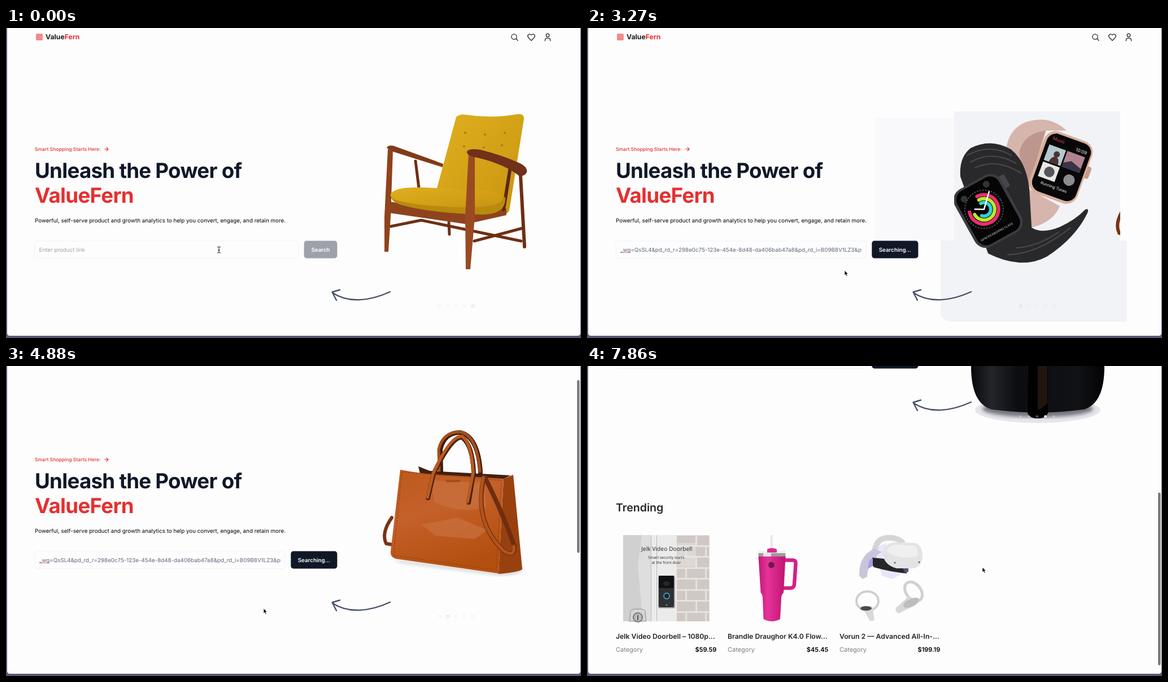
Write an HTML page that moves like this. It is 1018 by 550 pixels and loops after 8000 ms.

```html
<!DOCTYPE html>
<html lang="en">
<head>
<meta charset="utf-8">
<title>ValueFern</title>
<style>
html, body { margin: 0; width: 100%; height: 100%; overflow: hidden; background: #5a5775; }
svg { display: block; width: 1018px; height: 550px; font-family: Inter, sans-serif; font-optical-sizing: none; text-rendering: geometricPrecision; }
.b { font-weight: 700; }
.sb { font-weight: 600; }
.red { fill: #e43030; }
.line { fill: none; stroke-linecap: round; stroke-linejoin: round; }
.mid { text-anchor: middle; }
.end { text-anchor: end; }
.sm { font-size: 9.79px; }
.h1 { font-size: 36.7px; letter-spacing: -.73px; }
.title { font-size: 12.23px; fill: #222; }
.meta { font-size: 11px; }
.ad { font-family: "Open Sans", sans-serif; fill: #222; }
#dots circle { fill: #fff; filter: drop-shadow(.9px .9px .5px rgba(0, 0, 0, .8)); }
</style>
</head>
<body>
<svg viewBox="0 0 1018 550">
<defs>
  <clipPath id="win"><path d="M2 0H1017V541Q1017 546 1012 546H7Q2 546 2 541Z"/></clipPath>
  <clipPath id="frame"><rect x="650" y="140" width="294" height="382"/></clipPath>
  <clipPath id="field"><rect id="fieldClip" x="58" y="380" height="26"/></clipPath>
  <linearGradient id="cloth" x2="1" y2="1"><stop stop-color="#e0b01f"/><stop offset="1" stop-color="#c9940f"/></linearGradient>
  <linearGradient id="leather" x2=".4" y2="1"><stop stop-color="#bd5a1c"/><stop offset=".45" stop-color="#c4602a"/><stop offset="1" stop-color="#b4500f"/></linearGradient>
  <linearGradient id="gloss"><stop stop-color="#08080b"/><stop offset=".15" stop-color="#24252b"/><stop offset=".35" stop-color="#0c0d10"/><stop offset=".8" stop-color="#111216"/><stop offset="1" stop-color="#030304"/></linearGradient>
  <linearGradient id="wood"><stop stop-color="#28150b"/><stop offset=".4" stop-color="#5a3419"/><stop offset="1" stop-color="#1d0f08"/></linearGradient>
  <linearGradient id="pink"><stop stop-color="#c2187a"/><stop offset=".35" stop-color="#e6339a"/><stop offset="1" stop-color="#c0126f"/></linearGradient>
  <filter id="soft"><feGaussianBlur stdDeviation="3"/></filter>
  <pattern id="brick" x="160" y="276" width="66" height="39" patternUnits="userSpaceOnUse">
    <rect width="66" height="39" fill="#e6e2df"/>
    <path fill="#d0c8c4" d="M0 1H32V18H0ZM35 1H66V18H35ZM0 21H14V37H0ZM17 21H49V37H17ZM52 21H66V37H52Z"/>
  </pattern>
</defs>

<g clip-path="url(#win)">
<rect width="1018" height="550" fill="#fdfdfd"/>
<g id="page">
  <!-- header -->
  <rect x="53" y="10" width="12" height="12" rx="2" fill="#f58a8a"/>
  <text class="b" x="70" y="20.4" font-size="12.23" fill="#1c1c1c">Value<tspan class="red">Fern</tspan></text>
  <g class="line" stroke="#282828" stroke-width="1.3">
    <circle cx="899.5" cy="15.5" r="4.6"/><path d="M903 19L906.2 22.2"/>
    <path d="M930 22.3L924.8 17Q922.7 14.3 924.6 12Q927.3 9.6 930 12.6Q932.7 9.6 935.4 12Q937.3 14.3 935.2 17Z"/>
    <circle cx="959" cy="13" r="2.8"/><path d="M954.4 22.8V21.5Q954.6 18.3 957.4 18.2H960.6Q963.4 18.3 963.6 21.5V22.8"/>
  </g>

  <!-- panels behind the carousel -->
  <g id="panelA">
    <path fill="#f2f3f7" d="M650 148H944V379H956V521H642Q628 519 626 506H650Z"/>
    <rect x="510" y="160" width="434" height="260" fill="#f7f7fa"/>
  </g>
  <g id="panelB">
    <rect x="510" y="160" width="140" height="217" fill="#f9f9fb"/>
    <path fill="#f2f3f7" d="M650 148H944V377H956V521H644Q626 519 626 502V377H650Z"/>
  </g>
  <rect id="panelC" x="698" y="148" width="246" height="374" fill="#f2f3f7"/>

  <!-- hero text -->
  <text class="red" x="51" y="218" font-size="8.56" font-weight="500">Smart Shopping Starts Here:</text>
  <path class="line" stroke="#e43030" stroke-width="1.1" d="M174.5 215H181M178 212L181 215L178 218"/>
  <text class="b h1" x="51" y="266" fill="#101828">Unleash the Power of</text>
  <text class="b h1 red" x="51" y="310">ValueFern</text>
  <text class="sm" x="51" y="344.5">Powerful, self-serve product and growth analytics to help you convert, engage, and retain more.</text>

  <!-- search form -->
  <rect id="box" x="51" y="378" height="30.5" rx="5" fill="#fdfdfe" stroke="#eeeff2" stroke-width=".8"/>
  <text id="hint" class="sm" x="58.5" y="396.5" fill="#a0a3ab">Enter product link</text>
  <g clip-path="url(#field)">
    <text id="link" class="sm" x="59" y="396.5" fill="#5e677a">_wg=QsSL4&amp;pd_rd_r=298e0c75-123e-454e-8d48-da406bab47a8&amp;pd_rd_i=B09B8V1LZ3&amp;psc=1</text>
    <path id="spell" d="M59.5 398.3H77" stroke="#e0343c" stroke-width="1.2" stroke-dasharray="1.3 1"/>
  </g>
  <rect id="caret" x="59" y="387" width="1" height="13" fill="#222"/>
  <rect id="btn" y="377.6" height="30.8" rx="4.5"/>
  <text id="btnText" class="sm sb mid" y="396.5" fill="#fff"></text>

  <!-- carousel -->
  <g clip-path="url(#frame)"><g id="strip">
    <g>
      <g class="line" stroke="#6e2f14" stroke-width="6">
        <path d="M725 236L731 284M784 345L785 366M681 352L735 341L912 378M829 378L915 355" stroke-width="5"/>
        <path d="M911 262L918 388"/>
      </g>
      <path fill="url(#cloth)" d="M797 158Q803 152 815 154Q860 161 905 153Q917 151 917 161L891 324Q888 331 878 329L762 288Z"/>
      <g fill="#a87c0c"><circle cx="813" cy="186" r="2"/><circle cx="848" cy="189" r="2"/><circle cx="883" cy="186" r="2"/><circle cx="811" cy="210" r="2"/><circle cx="846" cy="212" r="2"/><circle cx="878" cy="208" r="2"/></g>
      <path fill="#823a18" d="M674 213Q676 207 686 209L774 241L773 247L684 219Z"/>
      <path fill="#8f431d" d="M676 215L685 217L681 335L677 397H670L670 335ZM679 308L815 330L886 320V332L815 348L678 328Z"/>
      <path class="line" stroke="#5d2812" stroke-width="6" d="M893 246L881 322"/>
      <path fill="#b98a0e" d="M681 295Q760 322 884 300Q886 330 845 331Q755 329 700 314Q680 308 681 295Z"/>
      <path fill="url(#cloth)" d="M681 294Q690 281 740 283L850 288Q880 291 880 304Q872 318 820 318Q730 317 690 305Q680 301 681 294Z"/>
      <path fill="#9a4a22" d="M819 222H830V335L822 428H814L813 335Z"/>
      <path fill="#70301a" d="M816 219Q820 213 840 216Q880 226 910 240Q924 247 922 256Q918 264 908 262Q880 240 830 229Q815 226 816 219Z"/>
    </g>

    <g transform="translate(294)">
      <path fill="#d6b5ac" d="M766 225Q768 178 805 166Q845 154 874 182L838 182L806 285L862 316Q850 345 812 354L800 275Z"/>
      <path fill="#bd978d" d="M790 222Q796 188 836 182L808 278Q795 250 790 222Z"/>
      <path fill="#29292c" d="M686 264Q683 230 704 213Q740 195 775 215Q802 236 808 285L812 354Q830 366 862 353Q890 340 907 322Q914 319 911 328Q890 372 840 405Q795 430 735 400Z"/>
      <path class="line" stroke="#4d4d50" stroke-width="2" stroke-dasharray="2 2" d="M698 226Q738 204 776 226M704 238Q742 216 784 240M712 248Q750 230 794 258M770 402Q820 402 880 355M785 390Q822 388 860 362"/>
      <g transform="translate(864 247) rotate(20)">
        <rect x="42" y="-18" width="10" height="22" rx="4" fill="#c99b84"/>
        <rect x="-45" y="-58" width="90" height="117" rx="21" fill="#d9ae98"/>
        <rect x="-40" y="-54" width="82" height="108" rx="17" fill="#08080a"/>
        <g transform="translate(0 2) scale(.92)">
          <path fill="#b5c8cf" d="M-36 -36H-2V-4H-36Z"/><path fill="#4a3430" d="M-26 -4Q-24 -16 -18 -17A6 6 0 1 1 -14 -17Q-8 -16 -7 -4Z"/>
          <path fill="#b18390" d="M1 -36H37V-4H1Z"/><path fill="#3a3448" d="M1 -12L15 -20L37 -12V-4H1Z"/>
          <path fill="#e8e8e6" d="M-36 -1H-2V29H-36Z"/><circle cx="-18" cy="14" r="10" fill="#55555a"/><circle cx="23" cy="16" r="11" fill="#8b8c90"/>
        </g>
        <text x="-31" y="-41" font-size="8" fill="#ef3b56">Music</text>
        <text x="14" y="-36" font-size="8" fill="#fff">10:09</text>
        <text class="mid" y="40" font-size="7" fill="#fff">Running Tunes</text>
      </g>
      <g transform="translate(737 328) rotate(-29)">
        <rect x="43" y="-48" width="13" height="24" rx="4" fill="#45464a"/>
        <rect x="-47" y="-62" width="94" height="116" rx="22" fill="#3b3c40"/>
        <rect x="-42" y="-58" width="84" height="108" rx="18" fill="#050506"/>
        <circle cx="-27" cy="-43" r="6" fill="#333"/><circle cx="20" cy="-47" r="6" fill="#333"/>
        <g class="line" stroke-width="6" transform="translate(-5 -10)">
          <circle r="34" stroke="#555" stroke-width="2" stroke-dasharray="1 4"/>
          <path stroke="#ed2c72" d="M0 -26A26 26 0 1 1 -25 -8"/><path stroke="#bce92b" d="M0 -19A19 19 0 1 1 -19 0"/><path stroke="#2fd3d8" d="M0 -12A12 12 0 1 1 -9 8"/>
          <path stroke="#fff" stroke-width="2.5" d="M0 0L23 -23M0 0L-14 -8"/>
        </g>
        <text class="mid" x="-5" y="38" font-size="5.2" fill="#ddd">12PM KICKBOXING CLASS</text>
      </g>
    </g>

    <g transform="translate(588)">
      <path fill="#cfcdd0" filter="url(#soft)" d="M685 392L872 414L914 404Q920 420 872 420L700 398Z"/>
      <path class="line" stroke="#7a3312" stroke-width="6" d="M683 318Q664 345 673 364L684 366"/>
      <path fill="#43200f" d="M730 227L750 235L893 243L876 252L733 240Z"/>
      <g class="line"><path stroke="#3a1d10" stroke-width="8" d="M770 236L769 197Q776 167 804 167Q836 174 840 238"/><path stroke="#a84d1b" stroke-width="5" d="M767 234L766 197Q773 166 804 166Q834 172 839 236"/></g>
      <path fill="url(#leather)" d="M698 233Q730 239 755 241L881 249L872 417L690 391Q680 388 681 378Z"/>
      <path fill="#c9713f" d="M752 252L846 256L850 300Q800 312 758 290ZM735 330L800 318L852 340L830 356L760 350Z" opacity=".7"/>
      <path fill="#98410f" d="M881 249L898 242L914 409Q913 414 872 418Z"/>
      <path fill="none" stroke="#8d3d10" stroke-dasharray="3 2" d="M701 237L877 252L868 411L686 385Z"/>
      <rect x="779" y="251" width="25" height="4" rx="1" fill="#a54c1a"/>
      <g class="line"><path stroke="#4a2210" stroke-width="8" d="M747 283L757 240Q790 172 808 176Q826 190 828 238L819 291"/><path stroke="#b85a22" stroke-width="5.500" d="M746 282L756 240Q788 170 808 174Q824 186 827 238L817 290"/>
      <path stroke="#6f2e0e" stroke-width="8" d="M846 247Q828 325 880 376Q901 390 900 369Q882 315 848 247"/><path stroke="#b1531c" stroke-width="5.500" d="M845 247Q828 325 880 376Q901 390 899 369"/></g>
    </g>

    <g transform="translate(882)">
      <path fill="#e9dcc4" d="M756 170H855L884 292H727Z"/>
      <path fill="url(#wood)" d="M796 292H815V350Q846 366 847 410Q847 437 806 437Q764 437 764 410Q765 366 796 350Z"/>
    </g>

    <g transform="translate(1176)">
      <ellipse cx="798" cy="482" rx="111" ry="23" fill="#e6e5eb"/>
      <ellipse cx="798" cy="480" rx="98" ry="15" fill="#77757e" filter="url(#soft)"/>
      <path fill="url(#gloss)" d="M684 250Q690 155 798 155Q906 155 912 250L916 405Q916 470 880 481Q800 492 716 481Q680 470 680 405Z"/>
      <path fill="none" stroke="#34353b" d="M683 300H913M779 310V400Q782 408 781 480"/>
      <path fill="#010102" d="M781 310H816V488Q812 497 798 497Q784 497 780 488Z"/>
      <path fill="#20160f" d="M798 400H815V470Q806 480 798 482Z"/>
    </g>
  </g></g>
  <g id="dots"></g>
  <path class="line" stroke="#475069" stroke-width="2.4" d="M680 468C645 484 607 489 578.500 470M591 464.500L577.500 468.500L585 483"/>

  <!-- trending -->
  <g transform="translate(0 428)">
    <text class="sb" x="51" y="234" font-size="19.6" fill="#282828">Trending</text>
    <g>
      <rect x="64" y="276" width="152.5" height="153" fill="#dedede"/>
      <path fill="#d0d0d0" d="M64 276H97L90 330L99 429H64Z"/><path fill="#ebebeb" d="M113 276H159V429H113Z"/><path stroke="#bcbcbc" d="M113.5 276V429M123.5 276V429"/>
      <rect x="159" y="276" width="57.5" height="153" fill="url(#brick)"/>
      <path fill="#e9e9e7" d="M160 290H193V332H160Z" opacity=".5"/>
      <text class="ad mid" x="141.3" y="303.5" font-size="10.3">Jelk Video Doorbell</text>
      <text class="ad mid" x="140.3" y="318" font-size="6.7">Smart security starts</text>
      <text class="ad mid" x="140.3" y="327" font-size="6.7">at the front door</text>
      <rect x="126" y="349" width="30" height="57" rx="2" fill="#aaa"/>
      <rect x="127" y="348" width="27" height="56" rx="2" fill="#2f3032"/><path fill="#101113" d="M127 348H154V370H127Z"/>
      <ellipse cx="141" cy="362" rx="6" ry="4" fill="#25282c"/><circle cx="141" cy="384" r="5" fill="#222" stroke="#3f9fd0" stroke-width="1.8"/><circle cx="141" cy="400" r="1.3" fill="#888"/>
      <path fill="#d5d5d3" stroke="#8e8e8e" d="M75.500 429L77 411Q78 407 90 407Q102 407 103 411L104.500 429Z"/><circle cx="90" cy="422" r="8" fill="#bbb" stroke="#777" stroke-width="2"/><path stroke="#555" stroke-width="2" d="M90 418V427"/>
    </g>
    <g>
      <path fill="#eae7f3" d="M324.500 276H329V300H324.500Z"/><path fill="#efeef0" d="M304 303L318 306H337L351 302V309H304Z"/>
      <path fill="#df2a91" d="M319 307V301Q327 297 336 301V307Z"/><path fill="#9e9a9e" d="M303.500 308H351.500V315H303.500Z"/><path fill="#e5e4e6" d="M312 308H326V315H312Z"/>
      <path fill="none" stroke="#d4208a" stroke-width="6.500" stroke-linejoin="round" d="M349 320.500H365Q370 321 369.500 327L367 364Q366 370 360 370H347"/>
      <path fill="url(#pink)" d="M303.500 314H351.500L348 378Q344 382 344 388L342 425Q327 433 312.500 425L311 388Q311 382 307.500 378Z"/>
      <circle cx="326.500" cy="329" r="5.500" fill="#74194f"/>
    </g>
    <g>
      <path fill="#e9e5fb" d="M508 300L530 290L522 330L556 346L540 354L522 348Z"/>
      <path fill="none" stroke="#d5d5d8" stroke-width="10" d="M508 325Q506 283 530 281Q550 279 560 291"/>
      <path fill="#c9c5dc" d="M482 348Q481 312 509 300L522 306Q497 320 496 350L488 354Z"/>
      <path fill="#26262a" d="M505 316L526 318L566 338V344Q540 342 508 333Q503 327 505 316Z"/><path fill="#a99be0" d="M500 320L506 317V331L497 336Z"/>
      <path fill="#e3e3e4" d="M524 308Q526 289 547 289L582 290Q594 295 594 313Q593 331 579 335L548 335Q525 329 524 308Z"/><path fill="#efeff0" d="M530 304Q535 292 551 293L580 295Q588 300 585 313Q550 322 530 304Z"/>
      <path fill="#594d75" d="M559 335H569V341L563 343Z"/><g fill="#555"><circle cx="545" cy="325" r="1.500"/><circle cx="588" cy="324" r="1.500"/></g>
      <ellipse cx="496.500" cy="393" rx="19.500" ry="17" fill="none" stroke="#cfcfd1" stroke-width="4"/><path fill="#d9d9da" d="M482 403L505 402L509 426Q505 430 500 427L492 412Z"/><ellipse cx="494" cy="406" rx="10" ry="4" fill="#4b4b4e"/>
      <ellipse cx="578" cy="376" rx="13" ry="19" transform="rotate(-38 578 376)" fill="none" stroke="#d0d0d2" stroke-width="5"/><path fill="#d8d8da" d="M570 384L582 400L552 415Q544 412 547 405Z"/><ellipse cx="574" cy="396" rx="15" ry="7" transform="rotate(-25 574 396)" fill="#bdbdc0"/>
    </g>
    <g id="labels"></g>
  </g>
</g>

<rect id="thumb" x="1011" width="4.5" height="306.500" rx="2.200" fill="#7b7b7d"/>
<g id="pill">
  <rect x="8" y="526" width="244.500" height="14" rx="7" fill="#3d3d40"/>
  <text x="13" y="535.600" font-size="7.200" font-weight="500" fill="#e6e6e6">valuefern-orrin.vercel.app/prod...ts/6608aa22b1a451cdb9b16f57</text>
</g>
<g id="cursor">
  <path id="beam" class="line" stroke="#222" d="M-2.500 -5Q0 -5 0 -3.500Q0 -5 2.500 -5M0 -4V5M-2.500 6Q0 6 0 4.500Q0 6 2.500 6M-1.500 1H1.500"/>
  <path id="arrow" fill="#000" stroke="#fff" stroke-width=".8" d="M0 0V9L2 7.200L3.600 10.500L5.200 9.800L3.700 6.600H6.400Z"/>
  <path id="hand" fill="#fff" stroke="#222" stroke-width=".9" d="M-.500 1.500Q.500 0 1.500 1.500L2.500 4L5 4.200L6 5.300V9L4.800 11H.500L-2 7.500Q-2.200 6 -.500 6.500Z"/>
</g>
</g>
</svg>

<script>
const $ = id => document.getElementById(id);
const set = (id, attrs) => { for (const k in attrs) $(id).setAttribute(k, attrs[k]); };
const show = (id, on) => { $(id).style.display = on ? '' : 'none'; };

$('dots').innerHTML = [0, 1, 2, 3, 4].map(i => `<circle cx="${767.5 + i * 14.7}" cy="493.6" r="2.4"/>`).join('');
$('labels').innerHTML = [
  ['Jelk Video Doorbell – 1080p…', '$59.59'],
  ['Brandle Draughor K4.0 Flow…', '$45.45'],
  ['Vorun 2 — Advanced All-In-…', '$199.19']
].map(([name, price], i) => {
  const x = 51 + i * 198;
  return `<text class="sb title" x="${x}" y="460">${name}</text>
    <text class="meta" x="${x}" y="483" fill="#7d7d7d">Category</text>
    <text class="meta sb end" x="${x + 178.3}" y="483">${price}</text>`;
}).join('');

const LOOP = 8000;
const STEPS = [0, 210, 810, 1170, 1350, 1530, 1720, 2260, 2430, 2600, 2770, 2940, 3270, 3450, 3630,
  4530, 4700, 4880, 5080, 5270, 5470, 5680, 5860, 6040, 6240, 6430, 6780, 6960, 7140, 7320, 7500, 7680, 7860];
const SCROLL = [[4500, 0], [4530, 5], [4700, 20], [4880, 49], [5080, 190], [5270, 340], [5470, 410], [5680, 428], [7680, 428], [7860, 404]];
const CURSOR_X = [[2200, 377], [2940, 456], [6700, 456], [7140, 700]];
const CURSOR_Y = [[2200, 393], [2940, 430], [6700, 430], [7140, 357]];

function track(keys, t) {
  const i = keys.findIndex(k => k[0] > t);
  if (i < 0) return keys[keys.length - 1][1];
  if (i === 0) return keys[0][1];
  const [t0, a] = keys[i - 1], [t1, b] = keys[i];
  return a + (b - a) * (t - t0) / (t1 - t0);
}

function slidePosition(t) {
  const turn = Math.floor((t - 1202) / 2000);
  const p = Math.min(1, (t - 1202 - turn * 2000) / 380);
  return turn + p * p * (3 - 2 * p);
}

function draw(t) {
  const within = (a, b) => t >= a && t < b;
  const scroll = track(SCROLL, t), pos = slidePosition(t);
  const pasted = t >= 1170, searching = t >= 2430;

  set('page', { transform: `translate(0 ${-scroll})` });
  set('strip', { transform: `translate(${-pos * 294})` });
  const active = (Math.round(pos) + 4) % 5;
  [...$('dots').children].forEach((dot, i) => { dot.style.opacity = i === active ? 1 : .3; });
  show('panelA', within(1350, 3270));
  show('panelB', within(3270, 4530));
  show('panelC', within(7320, 7680));

  const btnX = searching ? 504.3 : 527.6;
  set('box', { width: btnX - 61 });
  set('fieldClip', { width: btnX - 75.5 });
  set('btn', { x: btnX, width: 586.4 - btnX, fill: pasted ? '#101828' : '#9da2aa' });
  set('btnText', { x: (btnX + 586.4) / 2 });
  $('btnText').textContent = searching ? 'Searching...' : 'Search';
  show('hint', !pasted);
  show('link', pasted);
  show('spell', searching);
  show('caret', within(210, 810));

  set('thumb', { y: scroll * .562 - 2.5, opacity: t >= 7860 || within(4530, 6240) ? 1 : within(6240, 6430) ? .5 : 0 });
  const hover = within(5680, 7140);
  show('pill', hover);

  const x = track(CURSOR_X, t), y = track(CURSOR_Y, t), typing = y < 408 && t < 2940;
  set('cursor', { transform: `translate(${x} ${y})` });
  show('beam', typing);
  show('hand', hover);
  show('arrow', !typing && !hover);
}

let start;
function tick(now) {
  start ??= now;
  const t = (now - start) % LOOP;
  draw(STEPS.findLast(s => s <= t));
  requestAnimationFrame(tick);
}
draw(0);
requestAnimationFrame(tick);
</script>
</body>
</html>
```
